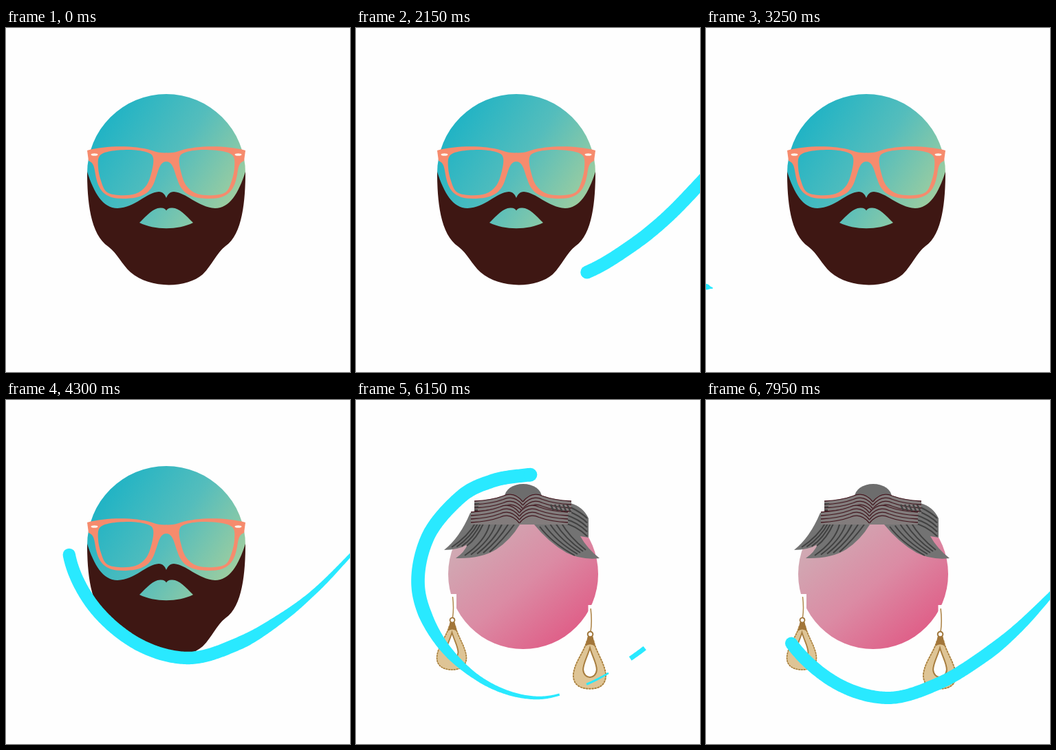
Write an HTML page with a canvas that moves like this. It is 500 by 500 pixels and loops after 8000 ms.

```html
<!DOCTYPE html>
<html lang="en">
<head>
<meta charset="utf-8">
<title>Brush loop</title>
<style>
html, body { margin: 0; width: 100%; height: 100%; overflow: hidden; background: #fefefe; }
canvas { display: block; width: 500px; height: 500px; }
</style>
</head>
<body>
<canvas id="stage" width="500" height="500"></canvas>
<script>
const ctx = document.getElementById('stage').getContext('2d');
const LOOP = 8000, SWITCH = 5550;
const PASSES = [0, 2000, 4005, 5700, 7700];
const PAPER = '#fefefe', CYAN = '#29e9ff';

// Piecewise linear interpolation through [x, y] keys
function interp(keys, x) {
  if (x <= keys[0][0]) return keys[0][1];
  for (let i = 1; i < keys.length; i++) {
    const [x0, y0] = keys[i - 1], [x1, y1] = keys[i];
    if (x <= x1) return y0 + (y1 - y0) * (x - x0) / (x1 - x0);
  }
  return keys[keys.length - 1][1];
}

// Smooth closed curve through points
function blob(pts) {
  const path = new Path2D(), n = pts.length, at = i => pts[(i + n) % n];
  path.moveTo(...pts[0]);
  for (let i = 0; i < n; i++) {
    const [a, b, c, d] = [at(i - 1), at(i), at(i + 1), at(i + 2)];
    path.bezierCurveTo(b[0] + (c[0] - a[0]) / 6, b[1] + (c[1] - a[1]) / 6,
      c[0] - (d[0] - b[0]) / 6, c[1] - (d[1] - b[1]) / 6, c[0], c[1]);
  }
  path.closePath();
  return path;
}

function fill(path, color) {
  ctx.fillStyle = color;
  ctx.fill(path);
}

function line(path, color, width) {
  ctx.strokeStyle = color;
  ctx.lineWidth = width;
  ctx.stroke(path);
}

function ellipse(x, y, rx, ry, color) {
  ctx.fillStyle = color;
  ctx.beginPath();
  ctx.ellipse(x, y, rx, ry, 0, 0, Math.PI * 2);
  ctx.fill();
}

function gradient(x0, y0, x1, y1, ...colors) {
  const g = ctx.createLinearGradient(x0, y0, x1, y1);
  colors.forEach((c, i) => g.addColorStop(i / (colors.length - 1), c));
  return g;
}

// Repeats a drawing mirrored about a vertical axis
function mirrored(axis, draw) {
  draw();
  ctx.save();
  ctx.translate(axis * 2, 0);
  ctx.scale(-1, 1);
  draw();
  ctx.restore();
}

// ---- Bearded face ----
const skin = gradient(140, 135, 335, 265, '#1fb3c5', '#54bdbc', '#a6cf9c');
const beard = new Path2D(`M118 209 C118 250 122 300 149 318 C162 328 168 343 181 355
  C208 379 262 379 286 358 C300 344 306 327 319 317 C344 300 348 250 348 209
  C338 240 325 262 304 262 C278 260 262 239 244 238 C238 238 235 242 233 247
  C231 242 228 238 222 238 C204 239 188 261 162 262 C141 262 128 240 118 209Z`);
const lips = new Path2D(`M194 283 C205 272 214 262 224 261.5 C229 261 232 263 233 265.5
  C234 263 237 261 242 261.5 C252 262 261 272 272 283 C250 294 216 294 194 283Z`);
const halfFrame = new Path2D(`M118 178 C145 171 185 170 212 178 Q222 182 234 181.5 L234 194
  C223 194 222 207 217 220 C211 240 198 248 170 248 C142 248 134 235 130 213
  C128 200 127 196 120 193Z`);
const lens = blob([[136, 186], [152, 179], [182, 177], [206, 181], [214, 189], [212, 208],
  [204, 229], [188, 241], [164, 243], [146, 238], [138, 222], [134, 203]]);

function drawBearded() {
  ellipse(233, 211, 115, 115, skin);
  fill(beard, '#3e1713');
  fill(lips, skin);
  mirrored(233, () => {
    fill(halfFrame, '#f68b6d');
    ellipse(128.5, 184, 5, 1.8, '#fff3ea');
  });
  fill(lens, skin);
  ctx.save();
  ctx.translate(466, 0);
  ctx.scale(-1, 1);
  fill(lens, gradient(131, 265, 326, 135, '#a6cf9c', '#54bdbc', '#1fb3c5'));
  ctx.restore();
}

// ---- Face with earrings ----
const cheeks = gradient(180, 170, 328, 350, '#cfadb5', '#db8ba4', '#e05783');
const hairLeft = new Path2D(`M128 218 Q151 200 166 164 L240 160 L238 181 Q225 203 204 217
  Q182 231 145 230 Q158 221 162 210 Q148 218 128 218Z`);
const hairRight = new Path2D(`M259 181 L256 150 L312 150 Q330 155 338 172 L338 200
  L326 198 Q336 216 354 230 Q328 233 306 222 Q280 207 259 181Z`);
const drop = new Path2D(`M-4 44 C-8 59 -21 73 -22 89 C-22 103 -11 107 0 107
  C11 107 21 103 21 89 C20 73 8 59 5 44Z`);
const dropHole = new Path2D('M0 53 C-3 64 -9 73 -9 82 C-8 95 8 95 9 82 C9 73 3 64 0 53Z');
const bandTop = new Path2D('M0 13 Q26 11 42 5 Q58 -3 70.5 13 L71 31 L0 31Z');

function strands(n, make, width) {
  for (let i = 0; i < n; i++) line(new Path2D(make(i, i / (n - 1))), '#414141', width);
}

function drawBand(x, y) {
  ctx.save();
  ctx.translate(x, y);
  mirrored(70.5, () => {
    fill(bandTop, '#827c7c');
    for (let i = 0; i < 4; i++) {
      const d = i * 5;
      line(new Path2D(`M0 ${13 + d} Q26 ${11.5 + d} 42 ${5.5 + d} Q58 ${-2 + d} 70.5 ${14 + d}`),
        '#42171f', 1.3);
    }
  });
  ctx.restore();
}

function drawEarring(x, y, scale) {
  ctx.save();
  ctx.translate(x, y);
  ctx.scale(scale, scale);
  line(new Path2D('M1 1 Q3 18 1 31'), '#b18a50', 1.5);
  line(new Path2D('M4 35 A3.5 3.5 0 1 1 4 34.9'), '#a0763a', 1.8);
  fill(drop, '#dec495');
  line(drop, '#c9a668', 1.4);
  // Beaded rim
  ctx.setLineDash([2, 1.8]);
  line(drop, '#a47b3c', 1.6);
  ctx.setLineDash([]);
  fill(dropHole, PAPER);
  line(dropHole, '#a77d3f', 1.8);
  fill(new Path2D('M-3 38 L4 38 L7 51 Q0 46 -6 51Z'), '#a2763a');
  ctx.restore();
}

function drawPink() {
  ellipse(243, 253, 109, 109, cheeks);
  ctx.fillStyle = PAPER;
  ctx.fillRect(112, 282, 34, 112);
  ctx.fillRect(337.5, 298, 28, 124);
  ellipse(243, 141, 27, 19, '#6d6d6d');
  fill(hairLeft, '#737373');
  fill(hairRight, '#737373');
  strands(4, (i, f) => `M${174 + f * 12} 178 Q${163 + f * 12} ${198 + f * 4} ${139 + f * 22} ${214 - f * 2}`, 2);
  strands(5, (i, f) => `M${194 + f * 36} 181 Q${188 + f * 26} ${205 - f * 2} ${158 + f * 36} ${226 - f * 5}`, 2);
  strands(5, (i, f) => `M${267 + f * 31} ${184 - f * 6} Q${284 + f * 26} ${207 - f * 8} ${318 + f * 16} ${226 - f * 8}`, 2);
  strands(5, (i, f) => `M${298 + f * 14} ${178 - f * 22} Q${320 + f * 8} ${182 - f * 18} 336 ${198 - f * 26}`, 2.2);
  drawBand(172, 134);
  strands(3, i => `M172 ${151 + i * 4.5} L${179 - i} ${151 + i * 4.5}`, 2);
  strands(5, i => `M${283 + i * 6} 152 L${288 + i * 6} 163`, 2.4);
  drawBand(167, 150);
  drawEarring(139.5, 285, 1);
  drawEarring(340, 302, 1.1);
}

// ---- Brush stroke: one clockwise lap around the head ----
const KNOTS = [[560, 160], [500, 226], [450, 277], [400, 317], [338, 354], [265, 375],
  [190, 354], [125, 297], [91, 220], [104, 142], [152, 83], [197, 60], [240, 52], [285, 50],
  [328, 59], [375, 97], [411, 150], [425, 225], [411, 285], [350, 351], [266, 382],
  [195, 387], [100, 387], [45, 384], [0, 376], [-60, 360]];
const STEP = 24;
const track = [], knotAt = [];

function buildTrack() {
  const n = KNOTS.length, at = i => KNOTS[Math.max(0, Math.min(n - 1, i))];
  let s = 0, prev = KNOTS[0];
  for (let i = 0; i < n - 1; i++) {
    const [a, b, c, d] = [at(i - 1), at(i), at(i + 1), at(i + 2)];
    for (let k = 0; k < STEP; k++) {
      const u = k / STEP;
      const p = [0, 1].map(j => b[j] + u * (c[j] - a[j]) / 2
        + u * u * (2 * a[j] - 5 * b[j] + 4 * c[j] - d[j]) / 2
        + u * u * u * (3 * b[j] - a[j] - 3 * c[j] + d[j]) / 2);
      s += Math.hypot(p[0] - prev[0], p[1] - prev[1]);
      if (k === 0) knotAt[i] = s;
      track.push([s, p[0], p[1]]);
      prev = p;
    }
  }
  s += Math.hypot(at(n)[0] - prev[0], at(n)[1] - prev[1]);
  knotAt[n - 1] = s;
  track.push([s, ...at(n)]);
}
buildTrack();

const END = knotAt[knotAt.length - 1];
const HEAD = [[0, 0], [150, knotAt[4]], [250, knotAt[7]], [750, knotAt[20]], [910, END]];
const TAIL = [[0, -800], [250, -190], [750, knotAt[10]], [1150, knotAt[21] - 3],
  [1250, knotAt[24] - 18], [1264, knotAt[24] + 10]];
const TAPER = [[750, 390], [1150, 120], [1250, 14]];
const WIDTH = [[150, 19], [250, 18], [750, 22], [1150, 16], [1250, 9], [1255, 5]];
// Relative width from the dry tail to the full body
const DRY = [[0, .35], [.07, .35], [.071, 0], [.16, 0], [.161, .13], [.26, .17], [.261, 0],
  [.36, 0], [.361, .16], [.5, .27], [.7, .45], [.82, .7], [1, 1]];

function pointAt(s) {
  let lo = 0, hi = track.length - 1;
  while (hi - lo > 1) {
    const mid = (lo + hi) >> 1;
    if (track[mid][0] <= s) lo = mid; else hi = mid;
  }
  const [s0, x0, y0] = track[lo], [s1, x1, y1] = track[hi];
  const len = s1 - s0 || 1, u = (s - s0) / len;
  const h = Math.hypot(x1 - x0, y1 - y0) || 1;
  return { x: x0 + (x1 - x0) * u, y: y0 + (y1 - y0) * u, nx: (y1 - y0) / h, ny: (x0 - x1) / h };
}

// Fills a ribbon between two distances; widthAt gives its width, off moves it sideways
function ribbon(from, to, widthAt, off = 0) {
  let left = [], right = [];
  const flush = () => {
    if (left.length > 1) {
      ctx.beginPath();
      left.concat(right.reverse()).forEach(p => ctx.lineTo(...p));
      ctx.closePath();
      ctx.fill();
    }
    left = [];
    right = [];
  };
  for (let s = from; ; s = Math.min(s + 2, to)) {
    const w = widthAt(s) / 2;
    if (w > 0) {
      const { x, y, nx, ny } = pointAt(s);
      const a = off + w, b = off - w;
      left.push([x + nx * a, y + ny * a]);
      right.push([x + nx * b, y + ny * b]);
    } else flush();
    if (s >= to) break;
  }
  flush();
}

function drawStroke(p) {
  if (p < 0 || p > 1262) return;
  const head = interp(HEAD, p), tail = interp(TAIL, p);
  const taper = interp(TAPER, p), full = interp(WIDTH, p);
  const from = Math.max(0, tail);
  if (head <= from) return;
  ctx.fillStyle = CYAN;
  ribbon(from, head, s => full * interp(DRY, (s - tail) / taper));
  if (head < END) {
    const { x, y } = pointAt(head);
    ellipse(x, y, full / 2, full / 2, CYAN);
  }
  // Loose bristle marks
  if (p > 650 && p < 850) ellipse(384, 271, 2.2, 6, CYAN);
  if (p > 1000 && p < 1230) {
    for (const [a, b] of [[.5, .72], [.76, 1.05]]) {
      ribbon(tail + a * taper, Math.min(END, tail + b * taper), () => 2.4, 5 + a * 6);
    }
  }
}

function render(t) {
  ctx.fillStyle = PAPER;
  ctx.fillRect(0, 0, 500, 500);
  const second = t >= SWITCH;
  if (second) drawPink(); else drawBearded();
  const start = PASSES.filter(s => s <= t).pop();
  ctx.save();
  if (second) ctx.translate(0, 58);
  drawStroke(t - start);
  ctx.restore();
}

const begin = performance.now();
function tick() {
  render((performance.now() - begin) % LOOP);
  requestAnimationFrame(tick);
}
tick();
</script>
</body>
</html>
```
